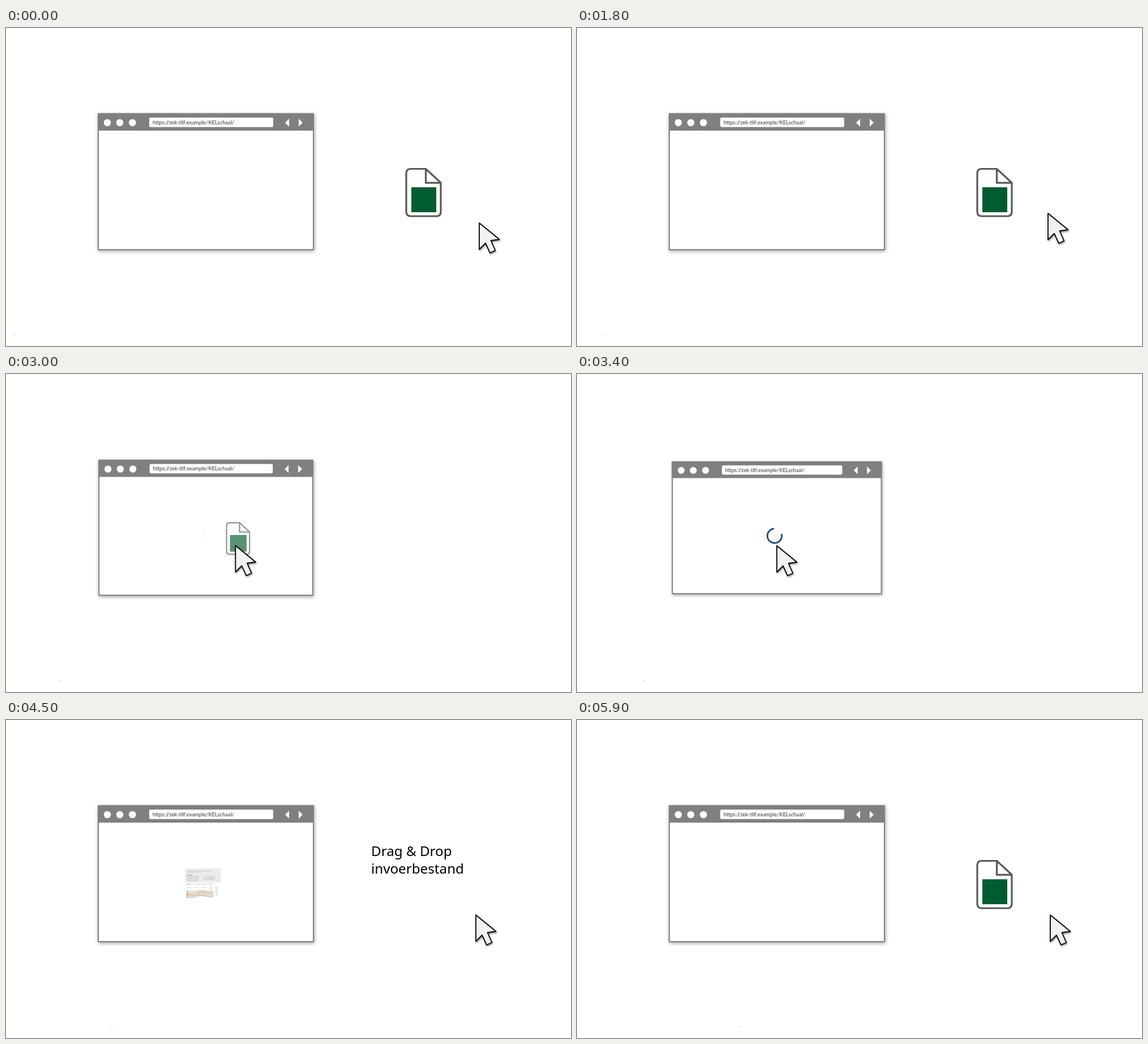
These frames come from a looping animation (998 by 561 pixels, 6000 ms). An HTML page:

```html
<!DOCTYPE html>
<html lang="nl">
<head>
<meta charset="utf-8">
<title>Drag &amp; Drop</title>
<style>
  html, body { margin: 0; width: 100%; height: 100%; overflow: hidden; background: #fff; }
  svg { display: block; width: 998px; height: 561px; }
  #browser { filter: drop-shadow(1px 2px 3px rgba(0, 0, 0, .38)); }
  #cursor { filter: drop-shadow(1.5px 2px 1.5px rgba(0, 0, 0, .45)); }
  .url { font: 9.4px Lato, sans-serif; fill: #333; }
  .caption { font: 24.2px "Noto Sans", "Open Sans", sans-serif; fill: #000; }
  #page text { font: 1.7px "Open Sans", sans-serif; fill: #666; }
  #page .head { font-weight: 700; fill: #333; }
</style>
</head>
<body>
<svg viewBox="0 0 998 561">
  <g id="window">
    <g id="browser">
      <rect x="163" y="151.5" width="380" height="239.5" fill="#fff" stroke="#808080" stroke-width="2"/>
      <rect x="162" y="150.5" width="382" height="30.5" fill="#808080"/>
    </g>
    <g fill="#fff">
      <circle cx="179" cy="167" r="6.3"/>
      <circle cx="201" cy="167" r="6.3"/>
      <circle cx="223.3" cy="167" r="6.3"/>
      <rect x="253" y="158" width="219" height="16.7" rx="2.5"/>
      <path d="M493 167l7-7v14zM524 167l-7-7v14z"/>
    </g>
    <text class="url" x="259" y="169.8">https://zek-tilf.example/KELschaal/</text>
  </g>

  <g id="page">
    <rect x="-31.5" y="-26.7" width="63" height="53.4" fill="#fff"/>
    <rect x="-31.5" y="-26.7" width="63" height="25" fill="#e8eaed"/>
  </g>

  <path id="spinner" fill="none" stroke="#1f497d" stroke-width="6"/>

  <g id="file">
    <path d="M741.5 248.5H715q-8 0-8 8V324q0 8 8 8H760q8 0 8-8V273L741.5 248.5V273.2H768"
      fill="#fff" stroke="#595959" stroke-width="3.2" stroke-linejoin="round"/>
    <rect x="716" y="281" width="44" height="44" fill="#025c31"/>
  </g>

  <g id="caption">
    <text class="caption" x="645" y="239.5"></text>
    <text class="caption" x="645" y="271"></text>
  </g>

  <g id="cursor">
    <path d="M1 1L36.5 30L21.5 32L29.3 49.5L20 53.8L12 36.5L1 47.5Z"
      fill="#f2f2f2" stroke="#000" stroke-width="1.8" stroke-linejoin="round"/>
  </g>
  <circle id="dot" cy="541" r="1" fill="#c4c4c4"/>
</svg>

<script>
const LOOP = 6000, STEP = 100;
const $ = id => document.getElementById(id);
const parts = {};
for (const id of ['window', 'page', 'spinner', 'file', 'caption', 'cursor', 'dot']) parts[id] = $(id);
const lines = ['Drag & Drop', 'invoerbestand'];
const rows = parts.caption.querySelectorAll('text');

// time, x, y of the pointer tip
const pointer = [
  [1400, 835, 343], [1800, 831, 326], [2100, 808, 309], [2600, 622, 301], [2800, 500, 301],
  [3100, 375, 302], [3300, 352, 302], [3500, 352, 302], [4000, 640, 337], [4200, 765, 342],
  [4500, 829, 343], [5200, 835, 343]
];
const windowScale = [[2800, 1], [3400, .971], [3600, .967], [4000, .979], [4200, 1]];
const spinnerScale = [[2900, 0], [3400, .48], [3800, 1], [4100, 1], [4300, 0]];
const pageScale = [[4200, 0], [4500, 1], [4900, 3.89]];

// Monotone cubic interpolation through the keys
function track(keys, t, col = 1) {
  const last = keys.length - 1;
  if (t <= keys[0][0]) return keys[0][col];
  if (t >= keys[last][0]) return keys[last][col];
  let i = 0;
  while (t >= keys[i + 1][0]) i++;
  const slope = k => k < 0 || k >= last ? 0 : (keys[k + 1][col] - keys[k][col]) / (keys[k + 1][0] - keys[k][0]);
  const tangent = k => {
    const a = slope(k - 1), b = slope(k);
    return a * b > 0 ? 2 * a * b / (a + b) : 0;
  };
  const h = keys[i + 1][0] - keys[i][0], u = (t - keys[i][0]) / h, v = 1 - u;
  return v * v * (1 + 2 * u) * keys[i][col] + u * u * (3 - 2 * u) * keys[i + 1][col]
    + h * u * v * (v * tangent(i) - u * tangent(i + 1));
}

const ramp = (t, from, to) => Math.min(1, Math.max(0, (t - from) / (to - from)));

function add(tag, attrs, text = '') {
  const el = document.createElementNS('http://www.w3.org/2000/svg', tag);
  for (const name in attrs) el.setAttribute(name, attrs[name]);
  el.textContent = text;
  parts.page.append(el);
}

function buildPage() {
  const label = (x, y, text, cls = '') => add('text', { x, y, class: cls }, text);
  label(-28, -22, 'Overzicht van alle stromen uit het ingevoerde bestand');
  label(-28, -19.8, 'met vraag en aanbod per jaar');
  label(-28, -15, 'Toelichting', 'head');
  for (let i = 0; i < 5; i++) {
    label(-28, -12.4 + i * 2, ['De stromen lopen van links', 'naar rechts door het beeld'][i % 2]);
    if (i < 4) label(2, -12.4 + i * 2, ['Kies een jaar of een sector', 'voor een ander overzicht'][i % 2]);
  }
  label(-29, 1.9, 'Overzicht', 'head');
  const colors = ['#4f81bd', '#e0812f', '#c0504d', '#7f7f7f', '#d9a441', '#6fb3c8'];
  colors.forEach((fill, i) => {
    add('circle', { cx: -18 + i * 6, cy: 1.3, r: .6, fill });
    label(-17 + i * 6, 1.9, 'stroom');
  });
  for (let i = 0; i < 3; i++) label(-28 + i * 13, 7, 'Totaal jaar');
  for (let i = 0; i < 8; i++) {
    label(22, 6 + i * 2.1, 'vraag');
    if (i < 4) label(12, 6 + i * 2.1, 'sector');
  }
  for (let i = 0; i < 9; i++) {
    const y = 13 + i * 1.5, end = 14 + (i * 5 % 9) * 1.25, color = colors[i * 5 % 6];
    add('path', {
      d: `M-27 ${y}H-18C-8 ${y} -10 ${end - 3} 0 ${end - 2}S10 ${end} 19 ${end}`,
      fill: 'none', stroke: color, 'stroke-width': .5 + i % 3 * .4, opacity: .6
    });
    add('rect', { x: -28.5, y: y - .5, width: 2, height: 1, fill: color });
  }
}

function drawSpinner(t) {
  const size = track(spinnerScale, t), r = 26.5;
  const turn = 80 + (t - 4000) * .225;
  const at = deg => {
    const a = deg * Math.PI / 180;
    return `${r * Math.cos(a)} ${r * Math.sin(a)}`;
  };
  parts.spinner.setAttribute('d', `M${at(40)}A${r} ${r} 0 1 0 ${at(-40)}`.replace(' 0 1 0 ', ' 0 1 1 '));
  parts.spinner.setAttribute('transform', `translate(349 285.5) rotate(${turn}) scale(${size})`);
  parts.spinner.style.display = size > 0 ? '' : 'none';
}

function draw(t) {
  const x = track(pointer, t, 1), y = track(pointer, t, 2);
  parts.cursor.setAttribute('transform', `translate(${x} ${y})`);

  const s = track(windowScale, t);
  parts.window.setAttribute('transform', `translate(353 271) scale(${s}) translate(-353 -271)`);

  const back = t >= 5000;
  const drop = 1 - ramp(t, 2900, 3200);
  const shift = back ? 0 : Math.min(0, x - 732);
  const size = back ? 1 : drop;
  parts.file.setAttribute('transform', `translate(${737.5 + shift} 290) scale(${size}) translate(-737.5 -290)`);
  parts.file.style.opacity = back ? ramp(t, 5100, 5500) : drop;

  drawSpinner(t);

  const zoom = track(pageScale, t);
  parts.page.setAttribute('transform', `translate(347.5 ${288.5 - 3.5 * ramp(zoom, 1, 3.89)}) scale(${zoom})`);
  parts.page.style.opacity = zoom > 0 ? .9 * (1 - ramp(t, 5100, 5500)) : 0;

  let typed = t < 3660 ? 0 : Math.floor((t - 3660) / 22);
  lines.forEach((line, i) => {
    rows[i].textContent = line.slice(0, Math.max(0, typed));
    typed -= line.length;
  });
  parts.caption.style.opacity = 1 - ramp(t, 4900, 5300);

  parts.dot.setAttribute('cx', 15 + 279 * (1 - Math.cos(Math.PI / 2 * t / LOOP)));
}

buildPage();
const start = performance.now();
function tick() {
  const t = (performance.now() - start) % LOOP;
  draw(Math.floor(t / STEP) * STEP);
  requestAnimationFrame(tick);
}
tick();
</script>
</body>
</html>
```
